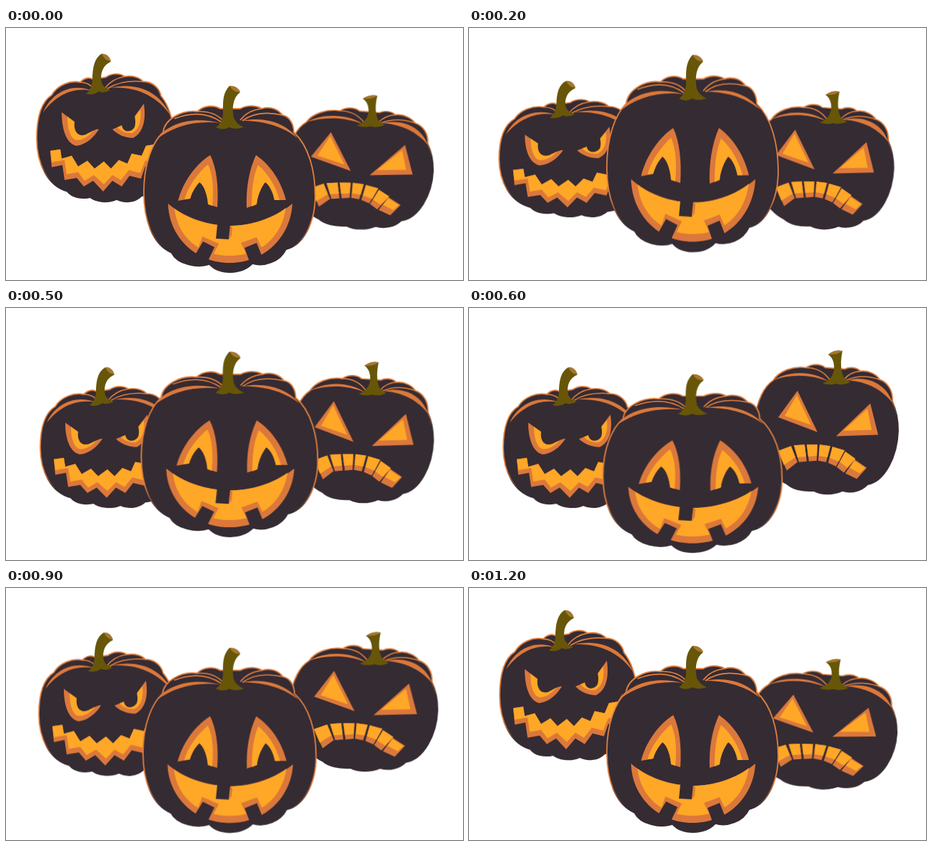
These frames come from a looping animation (640x353 px, 1300 ms). An HTML page without scripts:

```html
<!DOCTYPE html>
<html lang="en">
<head>
<meta charset="utf-8">
<title>Jumping pumpkins</title>
<style>
html, body { margin: 0; width: 100%; height: 100%; overflow: hidden; background: #fff; }
svg { display: block; width: 100%; height: 100%; }
.dark, .body { fill: #352b33; }
.body { stroke: url(#low); stroke-width: 1.8; }
#right .body { stroke: url(#high); }
.line { fill: none; stroke: #e0803f; stroke-width: 1.6; }
.cut { fill: #db783b; }
.glow { fill: #ffa726; }
.stem { fill: #675608; }
.tip { fill: #a5762f; }

/* each pumpkin squashes and stretches from its base */
.pumpkin { animation: 1300ms step-end infinite; }
#left { transform-origin: 139px 244px; animation-name: left; }
#right { transform-origin: 503.5px 249px; animation-name: right; }
#mid { transform-origin: 313px 343px; animation-name: mid; }

@keyframes left {
  0% { transform: none; }
  7.69% { transform: translate(1px, 9px) scale(1.02, .955); }
  15.38% { transform: translate(2px, 21px) scale(1.03, .918); }
  23.07% { transform: translate(4px, 31px) scale(1.03, .905); }
  30.76% { transform: translate(5px, 36px) scale(1.02, .902); }
  38.46% { transform: translate(5px, 36px) scale(1, .947); }
  61.53% { transform: translate(4px, 28px) scale(1, .955); }
  69.23% { transform: translate(3px, 19px) scale(1, .965); }
  76.92% { transform: translate(2px, 10px) scale(1, .975); }
  84.61% { transform: translate(1px, 3px) scale(1, .99); }
  92.3%, 100% { transform: translate(0, -3px) scale(1, 1.01); }
}
@keyframes right {
  0% { transform: translate(-8px, 33px) rotate(.8deg) scale(1.02, .915); }
  7.69% { transform: translate(-8px, 33px) rotate(.5deg) scale(1, .935); }
  15.38% { transform: translate(-7px, 33px) rotate(.4deg) scale(.98, .942); }
  38.46% { transform: translate(-4px, 24px) rotate(.3deg) scale(.99, .961); }
  46.15% { transform: translate(-2px, 12px) scale(1, .98); }
  53.84% { transform: none; }
  61.53% { transform: translate(0, 1px) scale(1.01, .99); }
  69.23% { transform: translate(-2px, 8px) rotate(.3deg) scale(1.03, .95); }
  76.92% { transform: translate(-5px, 17px) rotate(.5deg) scale(1.04, .913); }
  84.61% { transform: translate(-7px, 27px) rotate(.9deg) scale(1.04, .9); }
  92.3%, 100% { transform: translate(-9px, 33px) rotate(1.2deg) scale(1.035, .89); }
}
@keyframes mid {
  0% { transform: none; }
  7.69% { transform: translateY(-15px) scale(1, 1.04); }
  15.38% { transform: translateY(-29px) scale(1, 1.055); }
  23.07% { transform: translateY(-41px) scale(1, 1.055); }
  30.76% { transform: translateY(-36px) scale(1, 1.055); }
  38.46% { transform: translateY(-22px) scale(1.03, .992); }
  46.15% { transform: scale(1.045, .955); }
  53.84% { transform: scale(1.058, .924); }
  61.53% { transform: scale(1.03, .96); }
  69.23% { transform: scale(1.01, .99); }
  76.92%, 100% { transform: none; }
}
</style>
</head>
<body>
<svg viewBox="0 0 640 353" preserveAspectRatio="none">
  <defs>
    <linearGradient id="low" x2="0" y2="1">
      <stop offset=".7" stop-color="#e0803f"/><stop offset=".85" stop-color="#352b33"/>
    </linearGradient>
    <linearGradient id="high" x2="0" y2="1">
      <stop offset=".25" stop-color="#e0803f"/><stop offset=".4" stop-color="#352b33"/>
    </linearGradient>
  </defs>

  <g id="left" class="pumpkin">
    <path class="body" d="M43 155C43 125 50 103 64 94C72 80 90 73 104 76C110 69 118 69 122 72L140 69C148 63 160 63 166 68C178 66 188 70 192 75C206 75 215 85 217 95C229 110 234 130 235 150C236 200 215 234 190 235C180 245 165 245 155 240C142 246 125 243 118 237C105 240 92 237 86 229C58 221 43 190 43 155Z"/>
    <path class="line" d="M104 76Q117 76 125 87M166 68Q148 71 138 85M192 75Q162 72 142 85"/>
    <path class="cut" d="M52 118C64 90 92 76 121 88C94 82 70 94 52 118ZM146 84C180 75 216 88 230 122C212 96 182 81 146 84Z"/>
    <path class="stem" d="M134 36L147 47C136 52 131 63 134 77Q137 84 146 87Q137 92 130 89Q121 95 112 92Q120 86 121 73C121 55 124 42 134 36Z"/>
    <path class="tip" d="M134 36Q143 35 147 46Q139 47 134 36Z"/>
    <path class="cut" d="M78 118C78 145 86 163 99 165C113 163 123 153 130 142L98 133ZM193 106C196 125 194 146 178 154C166 154 156 149 149 142L175 131Z"/>
    <path class="glow" d="M86 124C86 145 92 158 101 157C110 156 117 150 122 144L98 133ZM188 114C190 128 187 142 177 147C169 148 161 145 156 139L175 131Z"/>
    <path class="dark" d="M96 131C94 147 103 153 112 149C116 147 120 144 130 141ZM162 135C163 147 175 147 180 139C182 133 181 128 180 122Z"/>
    <path class="cut" d="M62 172L76 170L78 183L92 179L101 194L114 186L124 197L137 187L147 197L158 185L170 190L176 176L190 179L196 165L208 163L215 152L210 192L195 194L189 211L173 207L162 222L149 214L136 229L122 214L109 222L99 210L82 213L79 192L64 195Z"/>
    <path class="glow" d="M62 172L76 170L78 183L92 179L101 194L114 186L124 197L137 187L147 197L158 185L170 190L176 176L190 179L196 165L208 163L210 184L195 186L188 203L172 199L161 213L149 206L137 219L123 206L110 214L101 202L85 205L82 185L64 188Z"/>
  </g>

  <g id="right" class="pumpkin">
    <path class="body" d="M404 140C405 115 415 95 428 86C436 73 456 65 474 68C482 62 494 62 501 68L528 70C536 66 546 68 550 73C562 71 574 79 577 85C589 89 596 102 595 116C601 130 603 145 603 158C602 195 584 231 560 235C552 244 538 248 525 244C512 250 496 250 485 244C470 245 455 242 447 234C420 221 402 180 404 140Z"/>
    <path class="line" d="M474 68Q495 68 507 85M550 73Q536 74 527 85M577 85Q552 76 530 86"/>
    <path class="cut" d="M428 86C450 72 484 72 506 88C480 77 452 77 428 86ZM533 86C562 78 588 94 595 118C580 99 560 88 533 86Z"/>
    <path class="stem" d="M505 49Q514 42 525 44C523 54 521 70 527 82L536 89Q526 94 516 91Q506 94 497 90Q510 86 513 72C514 62 512 54 505 49Z"/>
    <path class="tip" d="M505 49Q514 42 525 44Q518 50 505 49Z"/>
    <path class="cut" d="M462 101L490 160L435 139ZM564 119L575 164L516 166Z"/>
    <path class="glow" d="M461 107L481 150L444 137ZM560 127L566 157L526 158Z"/>
    <path class="cut" d="M435 187L453 180L462 203L447 215ZM457 179L472 178L475 202L464 203ZM475 178L490 178L489 201L478 202ZM493 178L508 180L502 203L491 201ZM511 181L528 186L516 209L505 204ZM529 188L543 198L527 218L517 210ZM542 199L559 211L545 227L529 219Z"/>
    <path class="glow" d="M435 187L453 180L459 196L443 207ZM457 179L472 178L474 195L462 196ZM475 178L490 178L489 194L477 195ZM493 178L508 180L504 196L492 194ZM511 181L528 186L520 202L507 197ZM529 188L543 198L532 211L521 203ZM542 201L557 211L549 219L535 211Z"/>
  </g>

  <g id="mid" class="pumpkin">
    <path class="body" d="M193 230C193 190 205 160 220 146C222 128 246 114 268 117C276 109 290 107 300 113L328 113C340 107 352 109 358 113C372 109 382 115 387 122C398 124 403 136 403 146C424 165 433 200 433 235C433 275 415 305 392 310C384 327 362 335 345 330C330 346 298 346 285 331C268 337 240 331 232 315C205 303 193 270 193 230Z"/>
    <path class="line" d="M236 127Q274 112 302 132M268 117Q292 116 304 130M358 113Q339 115 328 129M387 122Q352 114 331 130"/>
    <path class="cut" d="M211 156C226 133 262 123 300 133C264 129 234 138 211 156ZM331 130C366 123 394 136 408 154C390 140 366 130 331 130Z"/>
    <path class="stem" d="M313 81L328 90C318 97 316 112 319 126Q323 135 333 139Q320 143 313 139Q303 144 294 139Q303 133 304 120C304 103 303 92 313 81Z"/>
    <path class="tip" d="M313 81Q323 80 328 89Q320 92 313 81Z"/>
    <path class="cut" d="M286 178C264 192 247 218 241 242L258 239C261 228 267 220 271 216C278 221 282 235 283 247L296 251C298 222 295 196 286 178ZM350 178C340 200 336 225 337 252L351 247C352 235 358 222 363 216C370 221 374 231 376 241L392 241C386 217 372 193 350 178Z"/>
    <path class="glow" d="M283 191C268 204 255 222 250 240L258 239C261 228 267 220 271 216C278 221 282 235 283 247L289 249C291 225 290 207 283 191ZM353 192C346 207 344 228 344 250L351 247C352 235 358 222 363 216C370 221 374 231 376 241L383 241C378 222 368 205 353 192Z"/>
    <path class="cut" d="M227 246C250 266 285 277 314 277C345 277 380 264 401 246C399 290 365 329 313 329C265 329 228 292 227 246Z"/>
    <path class="glow" d="M236 253C260 271 290 277 314 277C345 277 372 267 392 252C386 292 358 319 313 319C270 319 240 292 236 253Z"/>
    <path class="cut" d="M275 292L298 302L289 320L268 312ZM329 301L351 293L359 310L338 320ZM314 277L317 279L316 290L313 296Z"/>
    <path class="dark" d="M296 275L294 295L312 296L314 276ZM276 299L292 307L282 328L264 319ZM334 308L351 301L359 321L342 330Z"/>
  </g>
</svg>
</body>
</html>
```
